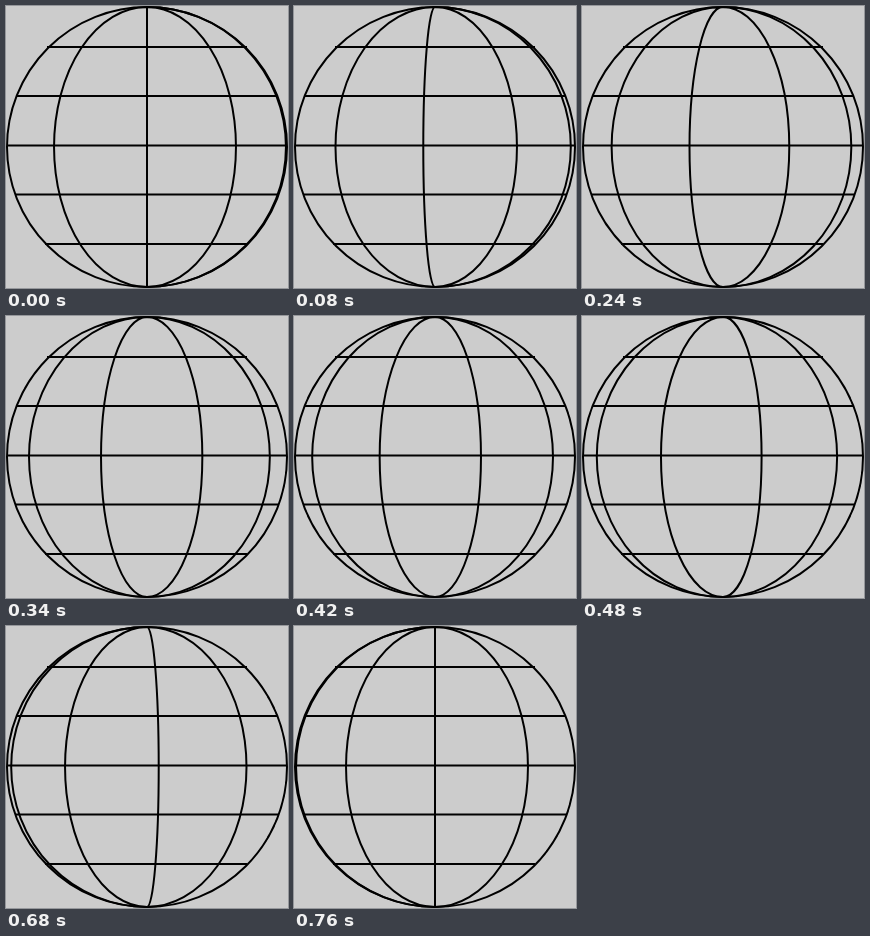
An HTML page for the animation above (0.78 s loop, 282 px wide and 282 px high).

```html
<!DOCTYPE html>
<html>
<head>
<meta charset="utf-8">
<title>Turning globe</title>
<style>
html, body { margin: 0; width: 100%; height: 100%; overflow: hidden; background: #ccc; }
svg { display: block; width: 100vw; height: 100vh; }
</style>
</head>
<body>
<svg viewBox="0 0 282 282" fill="none" stroke="#000" stroke-width="2">
  <circle cx="141" cy="141" r="140"/>
  <path d="M41 41H241M10 90H272M1 139.5H280M10 188.5H272M39 238H241"/>
  <path id="meridians"/>
</svg>
<script>
const LOOP = 780, STEP = 20, CX = 141, R = 140;
const meridians = document.getElementById('meridians');

// Distance from the axis: inner and outer quarter of a meridian's way to the rim
const inner = p => 114 * p - 25 * p * p;
const outer = p => 93 + 64 * p - 18 * p * p;

function halfEllipse(x) {
  const sweep = x > 0 ? 1 : 0;
  return `M${CX} ${CX - R}A${Math.abs(x).toFixed(2)} ${R} 0 0 ${sweep} ${CX} ${CX + R}`;
}

function draw(ms) {
  const p = Math.floor((ms % LOOP) / STEP) * STEP / (LOOP - STEP);
  const offsets = [outer(1 - p), inner(1 - p), -inner(p), -outer(p)];
  meridians.setAttribute('d', offsets.map(halfEllipse).join(''));
}

const start = performance.now();
function tick() {
  draw(performance.now() - start);
  requestAnimationFrame(tick);
}
tick();
</script>
</body>
</html>
```
